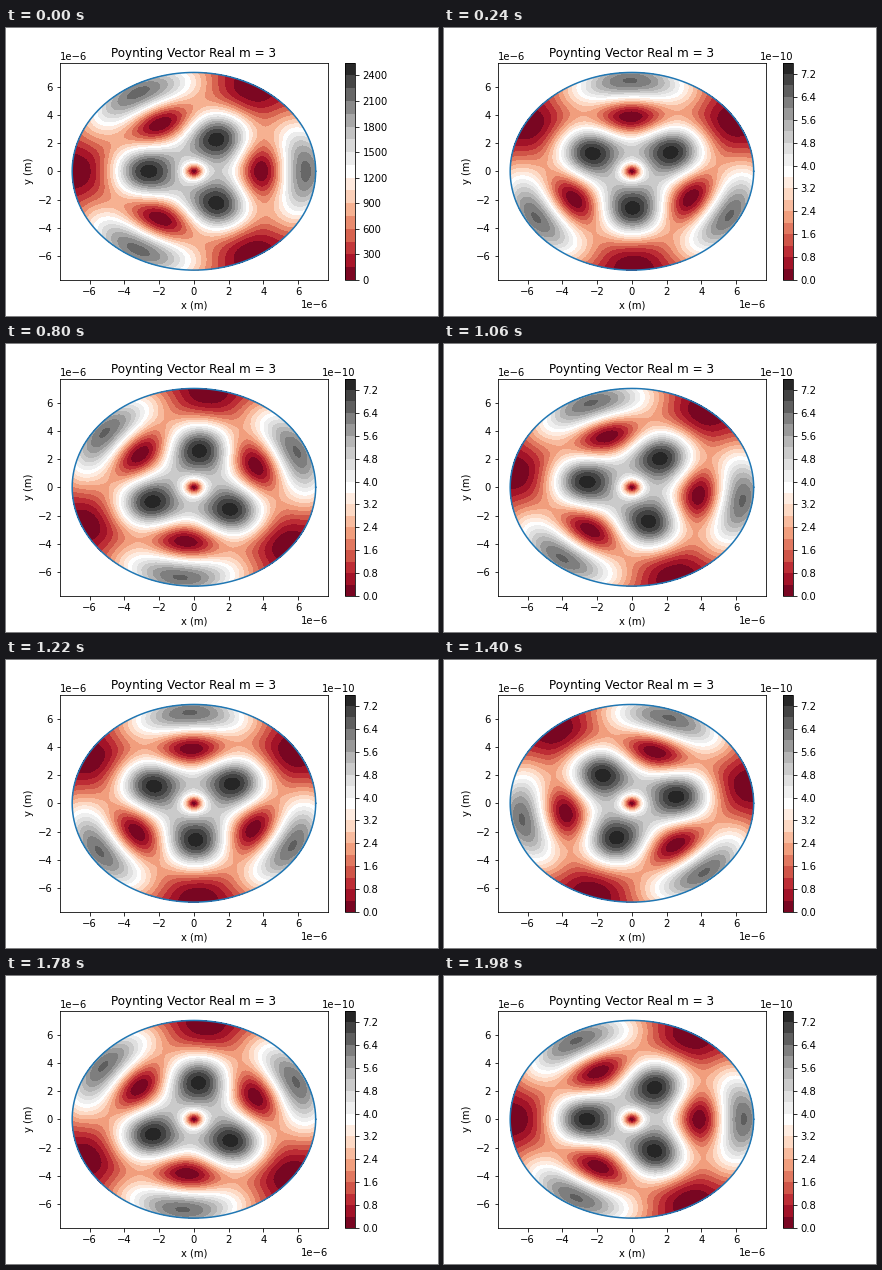
A matplotlib script that plays this animation: 432x288 px, repeating every 2 s.

```python
import numpy as np
import matplotlib.pyplot as plt
from matplotlib.animation import FuncAnimation

FRAMES = 100
RADIUS = 7.0  # micrometres
UNIT = 1e-6

plt.rcParams.update({"font.family": "DejaVu Sans", "font.size": 10})


def bessel(n, x, steps=80):
    """Bessel function J_n from its integral form."""
    tau = (np.arange(steps) + 0.5) * np.pi / steps
    return np.cos(n * tau - np.multiply.outer(x, np.sin(tau))).mean(axis=-1)


# Polar grid and the radial parts of the two interfering modes
r = np.linspace(0, RADIUS, 71)
phi = np.linspace(0, 2 * np.pi, 181)
R, PHI = np.meshgrid(r, phi)
X = UNIT * R * np.cos(PHI)
Y = UNIT * R * np.sin(PHI)

kr = r * (0.842 - 0.0127 * r)
inner = 3.65 * bessel(1, kr) + 5.4 * r**1.2 * np.exp(-1.9 * r)
outer = 3.65 * bessel(3, kr)
outer[0] = inner[0] = 0
peak = ((inner + outer) ** 2).max()


def intensity(i):
    """Three-lobed interference, turning clockwise; peak value is 1."""
    turn = 4 * np.pi * i / (FRAMES - 1)
    s = inner**2 + outer**2 - 2 * inner * outer * np.cos(3 * PHI + turn)
    return np.maximum(s, 0) / peak


# (peak value, contour levels) for the first frame and for all others
START = (2490.0, 150.0 * np.arange(18))
REST = (7.45e-10, 0.4e-10 * np.arange(20))


def draw_field(i):
    top, levels = START if i == 0 else REST
    return ax.contourf(X, Y, top * intensity(i), levels=levels, cmap="RdGy")


fig = plt.figure(figsize=(6, 4), dpi=72, facecolor="white")
ax = fig.add_axes([0.125, 0.125, 0.62, 0.755])
ax.plot(UNIT * RADIUS * np.cos(phi), UNIT * RADIUS * np.sin(phi),
        color="tab:blue", lw=1.5)
ax.set(title="Poynting Vector Real m = 3", xlabel="x (m)", ylabel="y (m)",
       xlim=(-7.7 * UNIT, 7.7 * UNIT), ylim=(-7.7 * UNIT, 7.7 * UNIT))


def add_scale(i, levels):
    cax = fig.add_axes([0.78375, 0.125, 0.755 * 4 / 6 / 20, 0.755])
    field = draw_field(i)
    fig.colorbar(field, cax=cax, ticks=levels[::2])
    field.remove()
    return cax


start_scale = add_scale(0, START[1])
rest_scale = add_scale(1, REST[1])
state = {"field": None}


def update(i):
    if state["field"] is not None:
        state["field"].remove()
    state["field"] = draw_field(i)
    start_scale.set_visible(i == 0)
    rest_scale.set_visible(i != 0)
    return []


anim = FuncAnimation(fig, update, frames=FRAMES, init_func=lambda: update(0),
                     interval=20, repeat=True, repeat_delay=0, blit=False)
plt.show()
```
